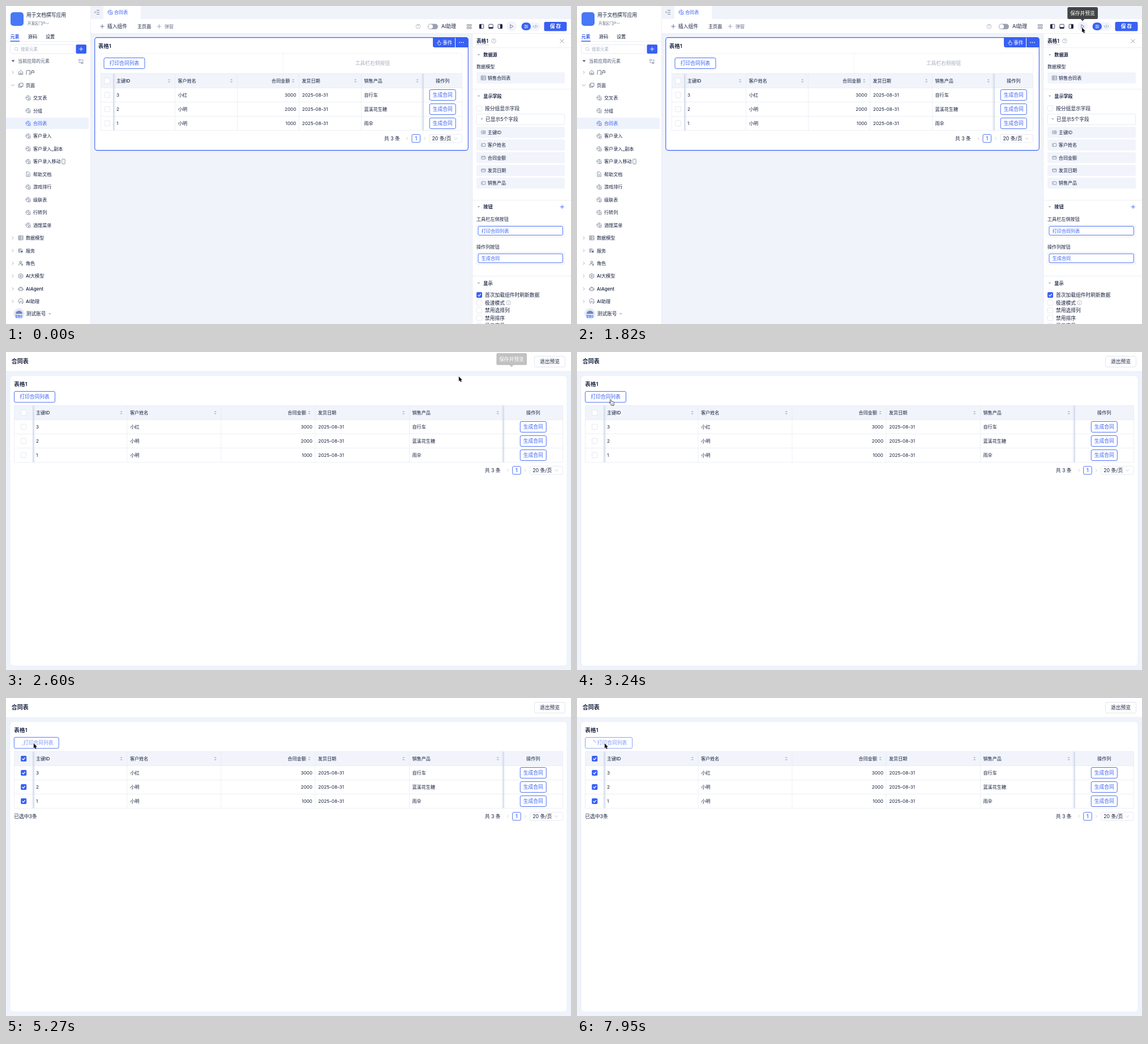
Write an HTML page that moves like this. It is 998 by 561 pixels and loops after 7990 ms.

```html
<!DOCTYPE html>
<html lang="zh-CN">
<head>
<meta charset="utf-8">
<title>合同表</title>
<style>
html, body { margin: 0; width: 100%; height: 100%; overflow: hidden; background: #f0f3fa; }
svg { display: block; width: 100%; height: 100%; }
text { font-family: Inter, "Noto Sans CJK SC", "Noto Sans CJK", sans-serif; white-space: pre; }
</style>
</head>
<body>
<svg id="stage" viewBox="0 0 998 561" preserveAspectRatio="none"></svg>
<script>
const LOOP = 7990;
const BLUE = '#3860f4', INK = '#17213f', MUTE = '#8790a8', PALE = '#b9c0d0', LINE = '#e6e9f1', SOFT = '#f1f4fb';
const S = 8.125, M = 8.75;

const rect = (x, y, w, h, fill, stroke, r = 0, extra = '') =>
  `<rect x="${x}" y="${y}" width="${w}" height="${h}" rx="${r}" fill="${fill || 'none'}" stroke="${stroke || 'none'}" ${extra}/>`;
const path = (d, stroke, w = 0.8, fill = 'none', extra = '') =>
  `<path d="${d}" stroke="${stroke || 'none'}" stroke-width="${w}" fill="${fill}" ${extra}/>`;
const circle = (x, y, r, fill, stroke, w = 0.8) =>
  `<circle cx="${x}" cy="${y}" r="${r}" fill="${fill || 'none'}" stroke="${stroke || 'none'}" stroke-width="${w}"/>`;
// y is the vertical middle of the glyphs
const text = (x, y, s, size = S, fill = INK, weight = 400, anchor = 'start') =>
  `<text x="${x}" y="${y + size * 0.375}" font-size="${size}" fill="${fill}" font-weight="${weight}" text-anchor="${anchor}">${s}</text>`;
const group = (id, body, extra = '') => `<g id="${id}" ${extra}>${body}</g>`;
const hline = (x1, x2, y, c = LINE) => path(`M${x1} ${y}H${x2}`, c, 0.7);
const vline = (x, y1, y2, c = LINE) => path(`M${x} ${y1}V${y2}`, c, 0.7);
const caret = (x, y, c = MUTE, r = 2.6) => path(`M${x - r} ${y - r * .5}h${2 * r}l${-r} ${r * 1.15}z`, '', 0, c);
const chevron = (x, y, dx, dy, c = MUTE) =>
  path(dx ? `M${x - dx} ${y - 2.6}l${2 * dx} 2.6l${-2 * dx} 2.6` : `M${x - 3} ${y - dy}l3 ${2 * dy}l3 ${-2 * dy}`, c, 0.7);
const plus = (x, y, r, c, w = 0.9) => path(`M${x - r} ${y}h${2 * r}M${x} ${y - r}v${2 * r}`, c, w);
const help = (x, y, s = '?') => circle(x, y, 3.8, '', MUTE, 0.6) + text(x, y, s, 5.5, MUTE, 400, 'middle');
const box = (x, y) => rect(x - 4.7, y - 4.7, 9.4, 9.4, '#fff', '#d9deea', 1.6, 'stroke-width=".7"');
const checked = (x, y) => rect(x - 5, y - 5, 10, 10, BLUE, '', 1.8) +
  path(`M${x - 2.5} ${y}l1.9 2l3.3 -3.8`, '#fff', 1.2);
const button = (x, y, w, h, s, size = M) =>
  rect(x, y, w, h, '#fff', BLUE, 2.5, 'stroke-width=".9"') + text(x + w / 2, y + h / 2, s, size, BLUE, 400, 'middle');
const glyph = {
  form: (x, y, c) => path(`M${x + 1} ${y + 3.6}a3.8 3.8 0 1 1 2.7 -3.4M${x - 3.6} ${y - .5}h4v-3`, c, 0.75) +
    rect(x + .7, y + .8, 3.3, 3, '', c, .4, 'stroke-width=".8"'),
  doc: (x, y, c) => path(`M${x - 3} ${y - 4}h4l2.3 2.3v5.7h-6.3zM${x - 1.4} ${y}h3M${x - 1.4} ${y + 2}h3`, c, 0.75),
  home: (x, y, c) => path(`M${x - 3.6} ${y - .6}l3.6 -3l3.6 3v4.2h-7.2zM${x - 1.2} ${y + 3.5}v-2.6h2.4v2.6`, c, 0.75),
  pages: (x, y, c) => path(`M${x - 2} ${y - 3.5}h6v5.4h-6zM${x - 2} ${y - 1.5}h-2v5.2h6v-1.8`, c, 0.75),
  grid: (x, y, c) => path(`M${x - 4} ${y - 3.6}h8v7.2h-8zM${x - 4} ${y - 1.2}h8M${x - 4} ${y + 1.2}h8M${x - 1.2} ${y - 3.6}v7.2`, c, 0.7),
  cloud: (x, y, c) => path(`M${x - 3.5} ${y - 3}h4.5l2 2v1M${x - 3.5} ${y - 1}h4M${x - 3.5} ${y + 1}h3M${x - 3.5} ${y - 3}v6h3`, c, 0.75) + circle(x + 1.8, y + 1.7, 1.8, c),
  role: (x, y, c) => circle(x, y - 2, 1.8, '', c) + path(`M${x - 3.6} ${y + 3.5}q0 -3.2 3.6 -3.2M${x + 1} ${y + 1.2}h2.5v2.3h-2.5z`, c, 0.75),
  cube: (x, y, c) => path(`M${x} ${y - 4.2}l3.8 2.1v4.2l-3.8 2.1l-3.8 -2.1v-4.2z`, c, 0.75) + circle(x, y, 1.4, '', c),
  bot: (x, y, c) => rect(x - 3.3, y - 2, 6.6, 5.2, '', c, 1.2, 'stroke-width=".8"') + path(`M${x} ${y - 4}v2M${x - 1.4} ${y}v1.2M${x + 1.4} ${y}v1.2M${x - 4.4} ${y}v1.5M${x + 4.4} ${y}v1.5`, c, 0.8),
  ai: (x, y, c) => path(`M${x - 2.5} ${y + 4}v-1.7a4 4 0 1 1 6.4 -2.6l.6 1.7h-1v2h-2`, c, 0.75) + text(x, y - .3, 'AI', 4, c, 500, 'middle')
};

function table(xs, top, withShade) {
  const [x0, x1, x2, x3, x4, x5, x6, x7] = xs, mid = (x0 + x1) / 2, act = (x6 + x7) / 2, hy = top + 12.5;
  const sorter = x => path(`M${x - 2.2} ${hy - .9}l2.2 -2.4l2.2 2.4zM${x - 2.2} ${hy + .9}l2.2 2.4l2.2 -2.4z`, '', 0, '#b0b6c6');
  let s = rect(x0, top, x7 - x0, 100, '#fff') + rect(x0, top, x7 - x0, 25, SOFT);
  ['主键ID', '客户姓名', '合同金额', '发货日期', '销售产品'].forEach((h, i) => {
    const num = i === 2;
    s += text(num ? xs[i + 2] - 16 : xs[i + 1] + 5, hy, h, S, INK, 500, num ? 'end' : 'start') + sorter(xs[i + 2] - 10.3);
  });
  s += text(act, hy, '操作列', S, INK, 500, 'middle') + box(mid, hy);
  [['3', '小红', '3000', '自行车'], ['2', '小明', '2000', '蓝溪花生糖'], ['1', '小明', '1000', '雨伞']].forEach((r, i) => {
    const y = hy + 25 * (i + 1);
    s += box(mid, y) + text(x1 + 5, y, r[0]) + text(x2 + 5.5, y, r[1]) + text(x4 - 5, y, r[2], S, INK, 400, 'end') +
      text(x4 + 5.5, y, '2025-08-31') + text(x5 + 5, y, r[3]) + button(act - 23, y - 9.5, 46, 19, '生成合同') + hline(x0, x7, y + 12.5);
  });
  s += hline(x0, x7, top) + hline(x0, x7, top + 25);
  [x0, x2, x3, x4, x5, x7].forEach(x => s += vline(x, top, top + 100));
  return s + rect(x1 - 1, top, 5, 100, 'url(#shadeL)') + rect(x6 - 4, top, 5, 100, 'url(#shadeR)');
}

function pager(r, y) {
  return text(r - 138, y, '共 3 条', M) + chevron(r - 97, y, -1.3, 0, PALE) + chevron(r - 66.5, y, 1.3, 0, PALE) +
    rect(r - 89, y - 7, 14.5, 14, '#fff', BLUE, 2, 'stroke-width=".9"') + text(r - 81.8, y, '1', M, BLUE, 500, 'middle') +
    rect(r - 58, y - 7.3, 57.5, 14.6, '#fff', '#dce1ec', 2, 'stroke-width=".7"') +
    text(r - 53.5, y, '20 条/页', M) + chevron(r - 11.5, y, 0, 1.7, PALE);
}

function sidebar() {
  let s = rect(0, 0, 149.5, 561, '#fff') + rect(8, 11, 23, 24, '#4878f6', '', 5) +
    text(36, 16, '用于文档撰写应用', M, INK, 500) + text(38, 30.5, '开发区门户', 6.4, '#59627c') + chevron(73, 30.5, 0, 1, MUTE) +
    text(7.5, 54, '元素', S, BLUE, 600) + text(38.8, 54, '源码') + text(70, 54, '设置') +
    hline(0, 149, 62.5) + rect(7.5, 61.3, 16.5, 1.5, BLUE) +
    rect(7.8, 68.3, 112.5, 15.5, '#fff', '#dce1ec', 2, 'stroke-width=".7"') + circle(18, 75.5, 2.8, '', PALE) +
    path('M20 77.6l2 2', PALE) + text(26, 76, '搜索元素', 7.5, '#a4acbe') +
    rect(123.5, 68, 18.5, 16, BLUE, '', 2) + plus(132.7, 76, 3.4, '#fff') +
    caret(12.5, 97, '#59627c', 3) + text(21, 97, '当前应用的元素', 8, '#4c5670') +
    path('M128.5 94h3v2.5h-3zM133 95h3v3M135.5 100h-6.5v-2M133 99h3v2.5h-3z', MUTE, 0.8);
  const rows = ['+home门户', '-pages页面', '交叉表', '分组', '合同表', '客户录入', '客户录入_副本', '客户录入移动', '帮助文档', '游戏排行',
    '级联表', '行转列', '酒馆菜单', '+grid数据模型', '+cloud服务', '+role角色', '+cubeAI大模型', '+botAIAgent', '+aiAI助理'];
  rows.forEach((row, i) => {
    const y = 117.2 + 22.45 * i, on = i === 4, top = row.match(/^([+-])(home|pages|grid|cloud|role|cube|bot|ai)(.*)/);
    if (on) s += rect(0, y - 10, 146, 20, '#eef2fb');
    if (top) s += chevron(12, y, top[1] === '+' ? 1.1 : 0, 1.3, MUTE) + glyph[top[2]](26, y, '#59627c') + text(35, y, top[3], S, INK, 500);
    else s += glyph[i === 8 ? 'doc' : 'form'](39, y, on ? BLUE : '#68718a') + text(48, y, row, S, on ? BLUE : INK, 500);
    if (i === 7) s += rect(98.8, y - 4.3, 5.4, 8.6, '', '#59627c', 1, 'stroke-width=".7"');
  });
  return s + rect(0, 531, 149, 30, '#fff') + circle(22.8, 542.8, 9.6, '#e3e9f8') + path('M17 543a6 5.5 0 0 1 12 0z', '', 0, '#7386b6') +
    text(22.8, 547.8, '管理员', 4.2, BLUE, 600, 'middle') + text(35.5, 542.7, '测试账号', M) + caret(77.3, 543, PALE) + vline(149.6, 0, 561);
}

function toolbar() {
  const pane = (x, d) => rect(x - 3.7, 32.3, 7.4, 7.4, '', INK, 1, 'stroke-width=".8"') + path(d, '', 0, INK);
  return rect(150, 0, 848, 23, '#f0f3fa') + rect(172, 0, 66, 24, '#fff') + rect(150, 23, 848, 25.5, '#fff') +
    path('M160 7.5h5M160 11h5M160 14.5h5M158.5 9.5l-2 1.5l2 1.5', '#59627c', 0.8) + glyph.form(184, 11, BLUE) +
    text(191, 11, '合同表', S, BLUE, 500) + plus(170, 36, 3.8, '#4c5670', .8) + text(179, 36, '插入组件', M) +
    text(232, 36, '主页面', S) + plus(270.5, 36, 3.8, MUTE, .8) + text(280, 36, '弹窗', S, '#6d768e') +
    help(728, 36) + rect(745, 31.5, 18, 9.6, '#9aa1b1', '', 4.8) + circle(750, 36.3, 4, '#fff') + text(769, 36, 'AI助理', M) +
    path('M814.5 32.5h3v3h-3zM819 32.5h3v3h-3zM814.5 37.5h3v2.5h-3zM819 37.5h3v2.5h-3z', '#59627c', .7) +
    pane(840, 'M836.3 32.3h3.4v7.4h-3.4z') + pane(856.5, 'M852.8 37.3h7.4v2.4h-7.4z') + pane(872.8, 'M872.8 32.3h3.7v7.4h-3.7z') +
    circle(893, 36, 9, SOFT) + path('M890.8 32.8l5 3.2l-5 3.2z', '#59627c', .8) +
    rect(910, 28.8, 34, 14.4, SOFT, '', 7.2) + rect(910.5, 29.2, 16.5, 13.6, BLUE, '', 6.8) +
    path('M915.3 34h7M915.3 36.2h7M915.3 38.4h7M917.5 33v2M920 35.2v2M917.5 37.4v2', '#fff', .7) +
    path('M933 34l-2 2l2 2M937 34l2 2l-2 2M935.8 33l-1.5 6', MUTE, .8) +
    rect(950.5, 28, 40, 16.3, BLUE, '', 2.5) + text(970.5, 36.2, '保 存', M, '#fff', 600, 'middle') + hline(150, 998, 48.7);
}

function card() {
  return rect(156.8, 55.6, 659.5, 199, '#fff', BLUE, 4, 'stroke-width="1.1"') + text(163, 70, '表格1', 9.4, INK, 600) +
    path('M754 55.5H793V73H757.5Q754 73 754 69.5Z', '', 0, BLUE) + path('M794 55.5H813Q816.5 55.5 816.5 59V73H794Z', '', 0, BLUE) +
    path('M761.5 64.5l1.3 -.5l1.2 1.3v-4.3q.9 -1 1.7 0v2.8l2.4 .7v2l-1 2.3h-3z', '#fff', .7) + text(771, 64.3, '事件', M, '#fff', 500) +
    [801, 804.4, 807.8].map(x => circle(x, 64.3, .9, '#fff')).join('') +
    rect(167.5, 83.5, 638, 35.5, '#fff', '#dde2ec', 0, 'stroke-width=".7" stroke-dasharray="2 1.6"') +
    path('M489.5 83.5V119', '#dde2ec', .7, 'none', 'stroke-dasharray="2 1.6"') +
    button(173, 91.5, 72, 19, '打印合同列表') + text(647.5, 101, '工具栏右侧按钮', M, '#a7aebf', 400, 'middle') +
    table([167.5, 190, 298.5, 408.5, 517.5, 627.5, 737, 805.5], 119.5) + pager(806, 233.7);
}

function panel() {
  const head = (y, s) => caret(835, y, '#a0a8b8', 2.2) + text(843.3, y, s, S, INK, 600);
  const chip = (y, s, icon) => rect(831, y - 9.7, 156, 19.4, SOFT, '', 2) + icon(843.3, y) + text(850.8, y, s);
  const field = k => (x, y) => rect(x - 3.5, y - 2.6, 7, 5.2, '', '#68718a', .6, 'stroke-width=".7"') +
    path([`M${x - 1.5} ${y - 1.2}v2.4M${x + .3} ${y - 1}h1.4v2h-1.4z`, `M${x - 1.7} ${y - 1.2}v2.4`, `M${x - 1.5} ${y - 2.6}v3M${x + 1.2} ${y - 2.6}v3`,
      `M${x - 3.5} ${y - .8}h7`, `M${x - 1.7} ${y - 1.2}v2.4`][k], '#68718a', .7);
  const slot = (y, s) => rect(831.3, y - 10.8, 155.2, 21.6, '#fff', '#e3e7f0', 2, 'stroke-width=".7"') +
    rect(834, y - 8.2, 149.5, 15.8, '#fff', BLUE, 2, 'stroke-width=".9"') + text(839.7, y, s, S, BLUE);
  let s = rect(824, 49, 174, 512, '#fff') + vline(823.8, 49, 561) + text(831, 61.8, '表格1', S + .5, INK, 600) +
    path('M831 68.5h22', MUTE, .7, 'none', 'stroke-dasharray="1.6 1.2"') + help(861.5, 61.5) +
    path('M978.5 58.5l7 7M985.5 58.5l-7 7', MUTE, .8) + hline(824, 998, 73.6) +
    head(86, '数据源') + text(831, 107.3, '数据模型') + chip(126.8, '销售合同表', (x, y) => glyph.grid(x, y, '#68718a')) +
    hline(824, 998, 146.7) + head(158.8, '显示字段') + box(836, 180.5) + text(846, 180.3, '按分组显示字段', M) +
    rect(831.3, 190.6, 155.2, 19, '#fff', '#dce1ec', 2, 'stroke-width=".7"') + caret(840.5, 199.3, '#a0a8b8', 2.2) + text(847, 200.2, '已显示5个字段', M);
  ['主键ID', '客户姓名', '合同金额', '发货日期', '销售产品'].forEach((f, i) => s += chip(222.8 + 22.4 * i, f, field(i)));
  s += hline(824, 998, 342.6) + head(354.2, '按钮') + plus(982.3, 354.3, 3.6, BLUE) + text(831, 376.3, '工具栏左侧按钮') + slot(396.7, '打印合同列表') +
    text(831, 425, '操作列按钮') + slot(445.3, '生成合同') + hline(824, 998, 476.6) + head(488.8, '显示');
  ['首次加载组件时刷新数据', '极速模式', '禁用选择列', '禁用排序', '显示序号'].forEach((o, i) => {
    const y = 509.8 + 13.6 * i;
    s += (i ? box : checked)(836, y) + text(846, y, o, M);
  });
  return s + help(887.5, 523.5, 'i');
}

const previewX = [14.5, 48, 214, 380, 546, 712.5, 879, 983.5];
const preview = rect(0, 0, 998, 561, '#eff3fb') + rect(0, 0, 998, 34, '#fff') + hline(0, 998, 34.2, '#e9edf6') +
  text(9.8, 16.5, '合同表', 10, INK, 600) + rect(933.5, 7.5, 54, 19, '#fff', '#d9dfeb', 2.5, 'stroke-width=".8"') +
  text(960.5, 17, '退出预览', M, INK, 400, 'middle') +
  rect(7, 41.8, 984, 512, '#fff', '#e7ebf5', 6, 'id="sheet" stroke-width=".7"') + text(14.3, 56.3, '表格1', 9.6, INK, 600) +
  group('empty', rect(14.5, 94.5, 969, 125.5, '#fff', '#edf0f5', 1, 'stroke-width=".7"') +
    text(499, 173, '没有符合查询条件的数据', 7.5, '#7f879a', 400, 'middle') + text(499, 184, '请修改条件后重新查询', 7.5, '#7f879a', 400, 'middle')) +
  group('data', table(previewX, 94.5) + pager(983.7, 208.8)) +
  group('picked', [107, 132, 157, 182].map(y => checked(31.2, y)).join('')) + group('count', text(14.3, 208.8, '已选中3条', M)) +
  rect(14.5, 69.5, 72, 19.3, '', BLUE, 2.5, 'id="wave"') +
  group('print', rect(14.5, 69.5, 72, 19.3, '#fff', BLUE, 2.5, 'id="frame" stroke-width=".9"') +
    group('spin', path('M28.5 74.8a4.2 4.2 0 0 1 4.2 4.2', BLUE, .9)) +
    group('label', text(24.3, 79.2, '打印合同列表', M, BLUE)));

const arrow = path('M0 0V8.6L1.9 6.9L3.3 10L4.9 9.3L3.6 6.3H6.1Z', '#fff', .8, '#111', 'paint-order="stroke" stroke-linejoin="round"');
const hand = path('M-.3 .2q.9 -.6 1.5 .3l.9 3.4l1.2 -.4l.9 .4l1.1 -.1l.8 .5q.7 2.4 .2 4.1l-.3 1.9h-4.1l-1.5 -2.3l-2.1 -2.1q-.2 -1.2 1.3 -.9l.8 .6l-1.2 -4.5q-.1 -.6 .5 -.9z', '#222', .8, '#fff', 'stroke-linejoin="round"') +
  path('M2.7 6.8v2M4.1 6.7v2', '#222', .6);

document.getElementById('stage').innerHTML =
  `<defs><linearGradient id="shadeL"><stop stop-color="#cfd8ea"/><stop offset="1" stop-color="#cfd8ea" stop-opacity="0"/></linearGradient>
  <linearGradient id="shadeR"><stop stop-color="#cfd8ea" stop-opacity="0"/><stop offset="1" stop-color="#cfd8ea"/></linearGradient></defs>` +
  group('editor', rect(0, 0, 998, 561, '#f0f3fa') + sidebar() + toolbar() + card() + panel()) + group('preview', preview) +
  group('tip', rect(866.3, 2, 53.7, 21, '#434446', '', 2.5) + path('M889 22.5h8l-4 4z', '', 0, '#434446') +
    text(893, 12.7, '保存并预览', M, '#fff', 500, 'middle')) +
  group('cursor', group('arrow', arrow) + group('hand', hand));

const $ = id => document.getElementById(id);
const show = (id, on) => $(id).setAttribute('opacity', +on);
const clamp = (t, a, b) => Math.min(1, Math.max(0, (t - a) / (b - a)));
const ease = p => p * p * (3 - 2 * p);

// time, x, y of the pointer tip
const trail = [[160, 731, -8], [560, 938, 40], [900, 891, 38], [960, 891, 37], [1580, 891, 37], [1620, 892, 38],
  [2450, 892, 38], [3180, 59, 84], [3240, 59, 84], [3420, 70, 86], [3780, 30.5, 104], [4040, 30.5, 104], [4320, 48.8, 80]];
function pointer(t) {
  let i = 0;
  while (i < trail.length - 2 && t > trail[i + 1][0]) i++;
  const [a, x, y] = trail[i], [b, u, v] = trail[i + 1], p = ease(clamp(t, a, b));
  return [x + (u - x) * p, y + (v - y) * p];
}

function render(t) {
  const open = t >= 2440, loaded = t >= 2560, busy = t >= 5110;
  show('editor', !open);
  show('preview', open);
  show('tip', t < 1820 ? 0 : 1 - clamp(t, 2520, 2640));
  $('sheet').setAttribute('height', loaded ? 512 : 199.5);
  show('empty', !loaded);
  show('data', loaded);
  show('picked', clamp(t, 3920, 4080));
  show('count', t >= 3960);

  const grow = ease(clamp(t, 5110, 5400));
  $('frame').setAttribute('width', 72 + 11.2 * grow);
  $('label').setAttribute('transform', `translate(${11.4 * grow} 0)`);
  show('print', busy ? 0.65 : 1);
  show('spin', grow);
  $('spin').setAttribute('transform', `rotate(${(t - 7950) * 0.36} 28.5 79)`);
  const ring = clamp(t, 5070, 5470);
  $('wave').setAttribute('width', 72 + 11.2 * grow);
  $('wave').setAttribute('stroke-width', 5 * ring);
  show('wave', t < 5070 ? 0 : 0.3 * (1 - clamp(t, 5070, 5790)));

  const [x, y] = pointer(t);
  const onButton = x > 14 && x < 87 && y > 69 && y < 89, onBox = Math.abs(x - 31) < 6 && Math.abs(y - 107) < 6;
  const useHand = open && !busy && (onButton || onBox);
  show('hand', useHand);
  show('arrow', !useHand);
  show('cursor', t >= 160);
  $('cursor').setAttribute('transform', `translate(${x} ${y})`);
}

const start = performance.now();
function tick() {
  render((performance.now() - start) % LOOP);
  requestAnimationFrame(tick);
}
render(0);
requestAnimationFrame(tick);
</script>
</body>
</html>
```
